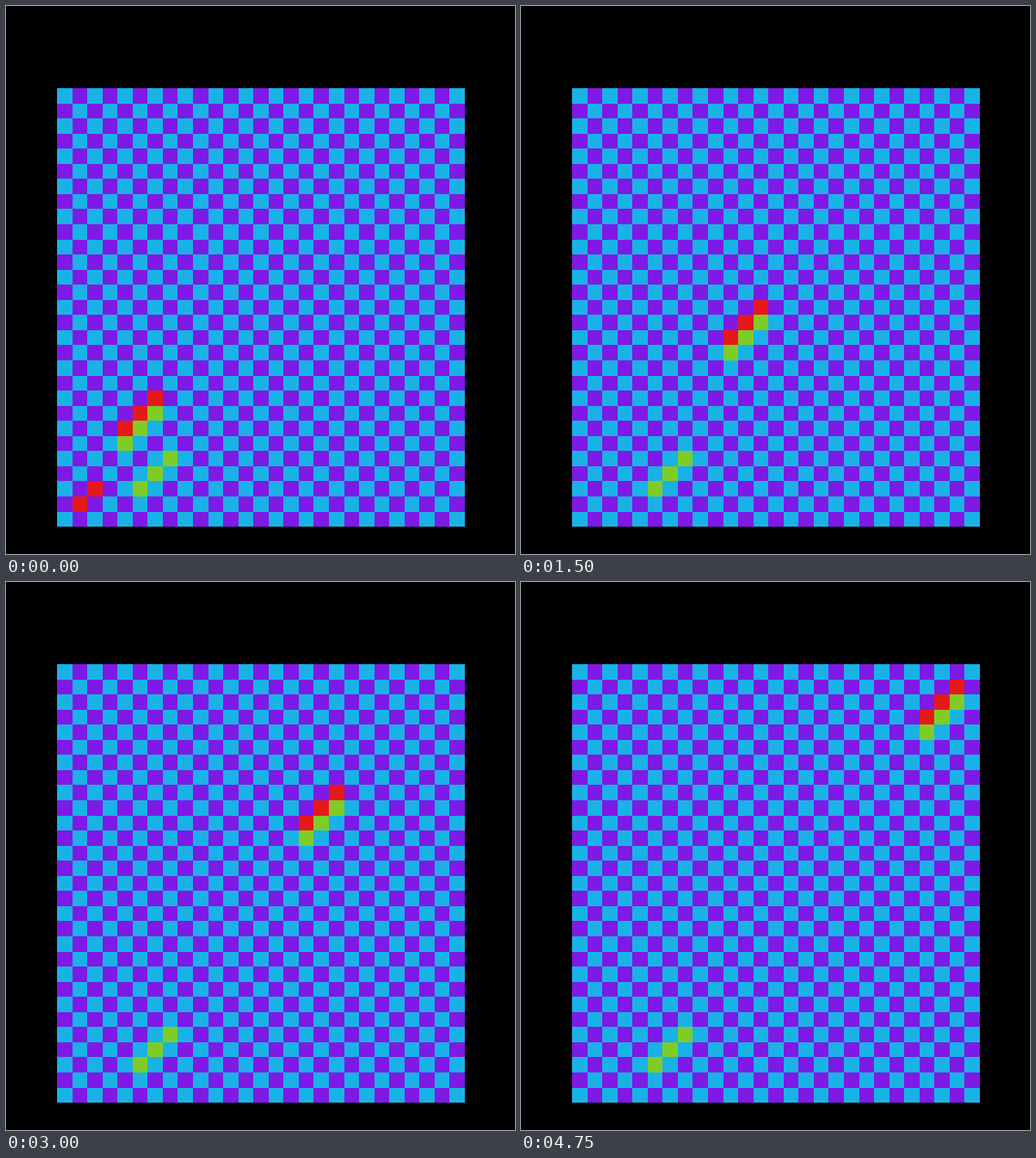
An HTML page with a canvas for the animation above (5000 ms loop, 558 by 600 pixels).

```html
<!DOCTYPE html>
<html lang="en">
<head>
<meta charset="utf-8">
<title>Checkerboard glider</title>
<style>
  html, body { margin: 0; width: 100%; height: 100%; overflow: hidden; background: #000; }
  canvas { display: block; }
</style>
</head>
<body>
<canvas id="stage" width="558" height="600"></canvas>
<script>
const ctx = document.getElementById('stage').getContext('2d');
const COLS = 27, ROWS = 29, CELL = 447 / 27;
const LEFT = 56, TOP = 90;
const STEP = 250, STEPS = 20;
const CYAN = '#19b2e6', PURPLE = '#7f19e6', RED = '#e61919', GREEN = '#7fcc26';

const edge = (origin, index) => Math.round(origin + index * CELL);

function fillCell(col, row, color) {
  const x = edge(LEFT, col), y = edge(TOP, row);
  ctx.fillStyle = color;
  ctx.fillRect(x, y, edge(LEFT, col + 1) - x, edge(TOP, row + 1) - y);
}

// Diagonal run of cells going down and to the left.
function fillDiagonal(col, row, length, color) {
  for (let i = 0; i < length; i++) fillCell(col - i, row + i, color);
}

function draw(step) {
  ctx.fillStyle = '#000';
  ctx.fillRect(0, 0, 558, 600);
  for (let row = 0; row < ROWS; row++)
    for (let col = 0; col < COLS; col++)
      fillCell(col, row, (row + col) % 2 ? PURPLE : CYAN);

  fillDiagonal(7, 24, 3, GREEN);
  if (step < 5) fillDiagonal(2, 26, 2, RED);

  fillDiagonal(6 + step, 20 - step, 3, RED);
  fillDiagonal(6 + step, 21 - step, 3, GREEN);
}

const start = performance.now();
function tick() {
  const elapsed = performance.now() - start;
  draw(Math.floor(elapsed / STEP) % STEPS);
  requestAnimationFrame(tick);
}
tick();
</script>
</body>
</html>
```
